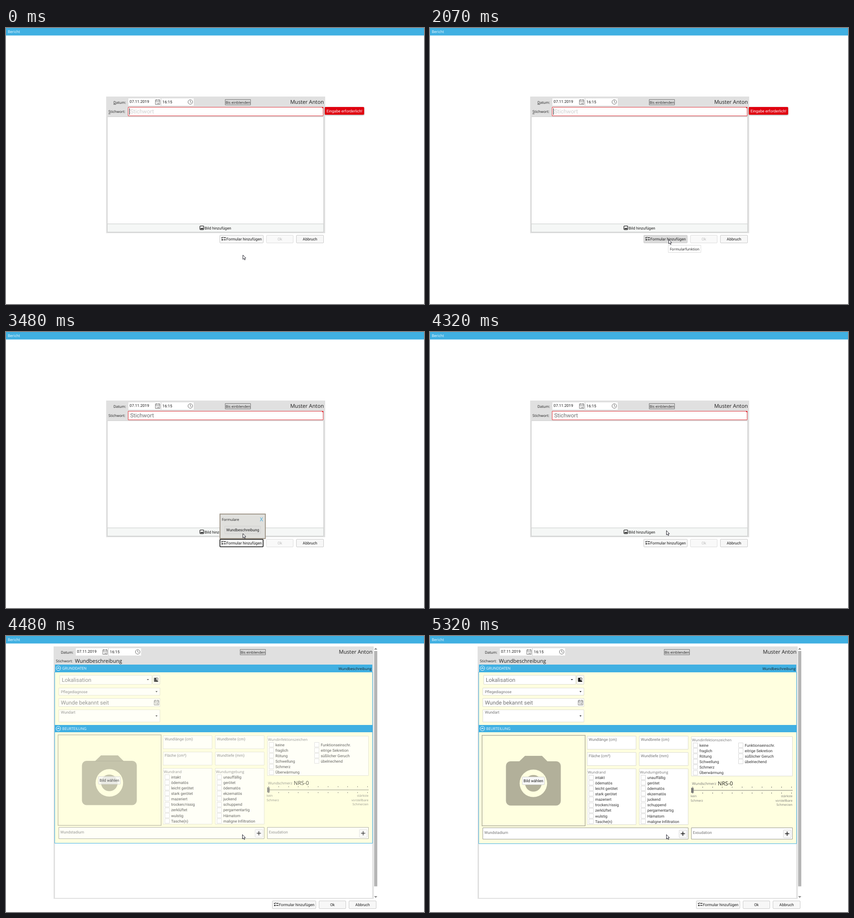
Write an HTML page with a canvas that moves like this. It is 922 px wide and 608 px high and loops after 7180 ms.

```html
<!DOCTYPE html>
<html lang="de">
<head>
<meta charset="utf-8">
<title>Bericht</title>
<style>
html, body { margin: 0; width: 100%; height: 100%; overflow: hidden; background: #fff; }
canvas { display: block; }
</style>
</head>
<body>
<canvas id="stage" width="922" height="608"></canvas>
<script>
const g = document.getElementById('stage').getContext('2d');
const LOOP = 7180, TICK = 77.2;
const SANS = '"Open Sans", "Noto Sans", sans-serif', ROBOTO = 'Roboto, Arial, sans-serif';
const BLUE = '#40b0e2', GRAY = '#e0e0e0', YELLOW = '#ffffe0', INK = '#1c1c1c', HINT = '#747474';
// tick, x, y of the pointer tip
const PATH = [[4, 522, 500], [14, 524.5, 468.5], [16, 526, 466], [42, 526, 466], [45, 522, 444],
  [46, 522, 444], [48, 521, 439], [50, 521, 439], [52, 521, 437.5]];
let n = 0;

const ramp = (a, b) => Math.min(1, Math.max(0, (n - a) / (b - a)));

function pointer() {
  let i = PATH.findIndex(k => k[0] > n);
  if (i < 0) return PATH.at(-1).slice(1);
  if (!i) return PATH[0].slice(1);
  const [a, ax, ay] = PATH[i - 1], [b, bx, by] = PATH[i], f = ramp(a, b);
  return [ax + (bx - ax) * f, ay + (by - ay) * f];
}

function box(x, y, X, Y, fill, edge, r = 0, w = 1) {
  g.beginPath();
  const h = edge ? w / 2 : 0;
  g.roundRect(x + h, y + h, X - x - 2 * h, Y - y - 2 * h, r);
  if (fill) { g.fillStyle = fill; g.fill(); }
  if (edge) { g.strokeStyle = edge; g.lineWidth = w; g.stroke(); }
}

// y is the middle of the capitals
function text(s, x, y, size = 8, font = SANS, color = INK, align = 'left') {
  g.font = `${size}px ${font}`;
  g.fillStyle = color;
  g.textAlign = align;
  g.fillText(s, x, y + size * .36);
}
const label = (s, x, y, color = INK, size = 8.5) => text(s, x, y, size, ROBOTO, color);

function line(color, w, ...p) {
  g.beginPath();
  for (let i = 0; i < p.length; i += 2) g.lineTo(p[i], p[i + 1]);
  g.strokeStyle = color; g.lineWidth = w; g.stroke();
}

function poly(color, ...p) {
  g.beginPath();
  for (let i = 0; i < p.length; i += 2) g.lineTo(p[i], p[i + 1]);
  g.closePath(); g.fillStyle = color; g.fill();
}

function disc(x, y, r, fill, edge) {
  g.beginPath(); g.arc(x, y, r, 0, 7);
  if (fill) { g.fillStyle = fill; g.fill(); }
  if (edge) { g.strokeStyle = edge; g.lineWidth = 1; g.stroke(); }
}

function faded(alpha, draw) {
  if (alpha <= 0) return;
  g.save(); g.globalAlpha = alpha; draw(); g.restore();
}

function calendar(x, y) {
  box(x - 5, y - 5, x + 6, y + 6, null, '#777');
  line('#777', 1, x - 5, y - 1.5, x + 6, y - 1.5);
  line('#777', 1, x - 2.5, y - 6, x - 2.5, y - 3);
  line('#777', 1, x + 3.5, y - 6, x + 3.5, y - 3);
  text('14', x + .5, y + 2.4, 6, ROBOTO, '#555', 'center');
}

function pictureButton(x, y, X) {
  box(x, y, X, y + 19, '#f5f7f6', '#c9cbca');
  box(427, y + 4.5, 437, y + 14, null, INK, 1.5, 1.3);
  poly(INK, 428.5, y + 12, 430.5, y + 9, 432, y + 10.5, 433.5, y + 8.5, 435.5, y + 12);
  label('Bild hinzufügen', 438.3, y + 9.5);
}

function header(L, T, R, bis, keyword) {
  text('Datum:', L + 16, T + 13);
  box(L + 49, T + 4, L + 120, T + 20, '#fff');
  label('07.11.2019', L + 51.6, T + 11, INK, 8.6);
  calendar(L + 113, T + 12);
  box(L + 122, T + 4, L + 193, T + 20, '#fff');
  label('16:15', L + 124, T + 12, INK, 8.7);
  disc(L + 185.5, T + 12, 5, null, '#666');
  line('#666', 1, L + 185.5, T + 8.5, L + 185.5, T + 12, L + 188, T + 13.5);
  box(bis, T + 6, bis + 57, T + 19, '#d9d9d9', '#757575');
  text('Bis einblenden', bis + 1.4, T + 13, 7.9);
  text('Muster Anton', R, T + 11.5, 11.6, SANS, INK, 'right');
  text('Stichwort:', L + 5, T + (keyword ? 32 : 33.5));
  if (keyword) text(keyword, L + 47, T + 31.5, 11.45);
}

function buttons(dx, dy, hover, focus, ready) {
  g.save();
  g.translate(dx, dy);
  box(471, 456, 568, 474, hover ? '#dcdcdc' : '#f7f7f7', focus ? '#111' : '#cacaca', 1.5, focus ? 1.6 : 1);
  line(INK, 1.2, 475, 461.5, 476.5, 463, 479, 460.3);
  line(INK, 1.4, 480, 462, 485, 462);
  line(INK, 1.4, 480, 466.5, 485, 466.5);
  disc(477, 466.5, 1.6, INK);
  label('Formular hinzufügen', 486, 465);
  box(574, 456, 634, 474, ready ? '#f7f7f7' : '#f9f9f9', ready ? '#cacaca' : '#dedede', 1.5);
  text('Ok', 604, 465, 8.5, ROBOTO, ready ? INK : '#bdbdbd', 'center');
  box(640, 456, 701, 474, '#f7f7f7', '#cacaca', 1.5);
  text('Abbruch', 670.5, 465, 8.5, ROBOTO, INK, 'center');
  g.restore();
}

function bar(x, y, X, title) {
  box(x, y, X, y + 16, BLUE);
  disc(x + 7.5, y + 8, 5, null, '#fff');
  line('#fff', 1.2, x + 5, y + 9, x + 7.5, y + 6.8, x + 10, y + 9);
  text(title, x + 16, y + 8.3, 8, SANS, '#fff');
}

function smallDialog(cy) {
  const clicked = n >= 33;
  box(221, 151, 704, 452, GRAY);
  header(221, 151, 701, 483);
  if (!clicked) {
    line(INK, .8, 237, 168.2, 243, 168.2);
    line(INK, .8, 226, 189, 230.5, 189);
  }
  box(269, 174, 700, 194, '#fff', '#e0343a');
  poly('#e0000f', 696, 174, 700, 174, 700, 178);
  label('Stichwort', 274, 183.8, clicked ? '#6e6e6e' : '#cfcfcf', 12.3);
  if (!clicked && Math.floor(n / 6.75) % 2 == 0) line('#111', 1, 272.5, 177, 272.5, 191);
  faded(1 - ramp(32, 36), () => {
    g.shadowColor = '#0006'; g.shadowBlur = 3; g.shadowOffsetY = 1;
    box(703, 174, 790, 191, '#e0000f', null, 2);
    g.shadowColor = 'transparent';
    label('Eingabe erforderlich!', 707, 182.8, '#fff', 8.6);
  });
  box(223, 195, 701, 432, '#fff', '#cfcfcf');
  pictureButton(223, 431, 701);
  buttons(0, 0, cy < 473 && cy > 456, clicked && n < 56, false);
  if (n >= 34 && n < 56) popup(cy <= 444);
  faded(clicked ? 1 - ramp(32, 34) : ramp(17, 21), () => {
    box(525, 478, 598, 495, '#fff', '#dcdcdc');
    text('Formularfunktion', 529, 486.8, 7.95);
  });
}

function popup(hover) {
  box(471, 400, 573, 456, '#e0e0dd', '#a1988b', 0, 2);
  text('Formulare', 476, 413, 7.9);
  text('X', 563.5, 412.5, 12, SANS, '#3fa9dc', 'center');
  box(482, 427, 562, 445, hover ? (n >= 55 ? '#d2d2d0' : '#dededc') : '#f7f7f7', '#d3d3d1', 1.5);
  label('Wundbeschreibung', 485.7, 435.8);
}

function emptyForm() {
  box(109, 57, 815, 545, GRAY);
  header(109, 58, 813, 520, 'Wundbeschreibung');
  box(112, 113, 813, 403, YELLOW);
  bar(112, 97, 813, 'GRUNDDATEN');
  text('Wundbeschreibung', 811, 105.8, 8.05, SANS, INK, 'right');
  bar(112, 221, 813, 'BEURTEILUNG');
  box(112, 403, 813, 524, '#fff', '#d4d4d4');
  pictureButton(112, 523, 813);
  buttons(112, 92.5, false, false, true);
}

const arrow = (x, y) => poly(INK, x - 2.3, y - 1, x + 2.3, y - 1, x, y + 1.5);
const field = (x, y, X, Y, edge = '#dcdcd0') => box(x, y, X, Y, '#fff', edge);

function checks(x, y, items) {
  items.forEach((s, i) => {
    const cy = y + i * 12.1;
    box(x, Math.round(cy - 5.5), x + 11, Math.round(cy + 5.5), '#fff', '#d6d6d6');
    label(s, x + 14.2, cy + .3, '#333');
  });
}

function group(x, y, X, Y, title, items) {
  field(x, y, X, Y);
  text(title, x + 2, y + 8.5, 8, SANS, HINT);
  checks(x + 4, y + 19.5, items);
}

function baseFields() {
  field(118, 86, 322, 107);
  label('Lokalisation', 123, 96.3, HINT, 12.1);
  arrow(313, 96);
  box(323, 86, 340, 107, '#f9f9f4', '#d8d8d0', 1.5);
  box(326.5, 92, 332, 101, INK, null, 1);
  disc(333, 94.5, 2.3, '#fff', INK);
  box(331, 98, 335.5, 101, INK);
  field(116, 114, 340, 131);
  label('Pflegediagnose', 121, 123, HINT);
  arrow(332, 122.5);
  field(116, 137, 340, 156);
  label('Wunde bekannt seit', 121, 146.3, HINT, 12.1);
  calendar(331.5, 146.5);
  field(116, 162, 340, 190);
  label('Wundart', 121, 167.8, HINT);
  arrow(332, 176);
}

function camera() {
  const c = '#b2b09a';
  box(114, 218, 343, 419, null, '#b0ae9c', 0, 1.5);
  g.beginPath();
  g.roundRect(167.5, 276, 121, 97.5, 10);
  g.fillStyle = c; g.fill();
  poly(c, 196, 277, 209.5, 264, 247, 264, 260, 277);
  faded(1, () => { g.globalAlpha = 1; disc(228, 324.5, 30.3, YELLOW); });
  disc(228, 324.5, 18.3, c);
  box(203, 310, 253, 328, '#f7f7f7', '#d5d5d0', 1.5);
  text('Bild wählen', 228, 318.8, 8.5, ROBOTO, INK, 'center');
}

function slider() {
  text('Wundschmerz', 578, 324.8, 8, SANS, HINT);
  text('NRS-0', 634.7, 324.3, 11.9);
  line('#a3a397', 1.5, 579, 340, 800, 340);
  for (let i = 0; i <= 10; i++) {
    const x = Math.round(579 + i * 21.8) + .5;
    line('#555', 1, x, 332, x, 334);
    line('#555', 1, x, 345, x, 347);
  }
  box(576, 334.5, 581.5, 345.5, '#7b7b7b');
  ['kein', 'Schmerz'].forEach((s, i) => text(s, 575, 352.5 + i * 9.6, 6.8, SANS, HINT));
  ['stärkste', 'vorstellbare', 'Schmerzen'].forEach((s, i) =>
    text(s, 799.5, 352.5 + i * 9.6, 6.8, SANS, HINT, 'right'));
}

function plusField(x, X, title) {
  field(x, 422, X, 448, '#989890');
  label(title, x + 3.8, 433.2, HINT);
  box(X - 21, 427, X - 3, 445, '#f9f9f9', '#d8d8d8', 1.5);
  line(INK, 1.6, X - 17, 435.5, X - 7.5, 435.5);
  line(INK, 1.6, X - 12.3, 430.8, X - 12.3, 440.2);
}

function ratingFields() {
  camera();
  [['Wundlänge (cm)', 346, 220], ['Wundbreite (cm)', 461, 220],
   ['Fläche (cm²)', 346, 256], ['Wundtiefe (mm)', 461, 256]].forEach(([s, x, y]) => {
    field(x, y, x + 109, y + 30);
    label(s, x + 4, y + 7.5, HINT);
  });
  group(346, 292, 455, 416, 'Wundrand', ['intakt', 'ödematös', 'leicht gerötet', 'stark gerötet',
    'mazeriert', 'trocken/rissig', 'zerklüftet', 'wulstig', 'Tasche(n)']);
  group(461, 292, 570, 416, 'Wundumgebung', ['unauffällig', 'gerötet', 'ödematös', 'ekzematös',
    'juckend', 'schuppend', 'pergamentartig', 'Hämatom', 'maligne Infiltration']);
  group(576, 221, 800, 309, 'Wundinfektionszeichen',
    ['keine', 'fraglich', 'Rötung', 'Schwellung', 'Schmerz', 'Überwärmung']);
  checks(680, 240.5, ['Funktionseinschr.', 'eitrige Sekretion', 'süßlicher Geruch', 'übelriechend']);
  slider();
  plusField(116, 570, 'Wundstadium');
  plusField(576, 800, 'Exsudation');
}

function fullForm() {
  const shift = n < 59 ? -1 : 0;
  box(105, 23, 811, 579, GRAY);
  header(105, 23, 808.3, 516, 'Wundbeschreibung');
  box(108, 457 + shift, 808, 577, '#fff');
  box(107, 79, 809, 458 + shift, YELLOW, BLUE);
  bar(108, 63, 808, 'GRUNDDATEN');
  text('Wundbeschreibung', 806.3, 71.8, 8.05, SANS, INK, 'right');
  bar(108, 196, 808, 'BEURTEILUNG');
  faded(.75 + .25 * ramp(58, 60), baseFields);
  faded(.75 + .25 * ramp(58, 69), () => { g.translate(0, shift); ratingFields(); });
  box(811, 23, 820, 579, '#fff');
  box(812, 33, 819, 551.5, '#b5b5b5');
  poly('#8c8c8c', 812, 30, 819, 30, 815.5, 26);
  poly('#8c8c8c', 812, 573, 819, 573, 815.5, 577);
  buttons(116, 127, false, false, true);
}

function drawPointer(x, y) {
  g.save();
  g.translate(x + .5, y);
  g.lineJoin = 'round';
  poly('#fff', 0, 0, 0, 9.6, 2.2, 7.6, 3.8, 11, 5.3, 10.3, 3.8, 7, 6.6, 6.8);
  g.strokeStyle = '#22222c'; g.lineWidth = 1; g.stroke();
  g.restore();
}

function frame(now) {
  n = Math.floor((now % LOOP + 15) / TICK);
  g.textRendering = 'geometricPrecision';
  box(0, 0, 922, 608, '#fff');
  box(0, 0, 922, 16.6, BLUE);
  text('Bericht', 4, 7.6, 8.1, SANS, '#fff');
  const [x, y] = pointer();
  if (n < 57) smallDialog(y);
  else if (n < 58) emptyForm();
  else fullForm();
  drawPointer(x, y);
  requestAnimationFrame(frame);
}
const start = performance.now();
const loop = frame;
frame = now => loop(Math.max(0, performance.now() - start));
frame();
</script>
</body>
</html>
```
